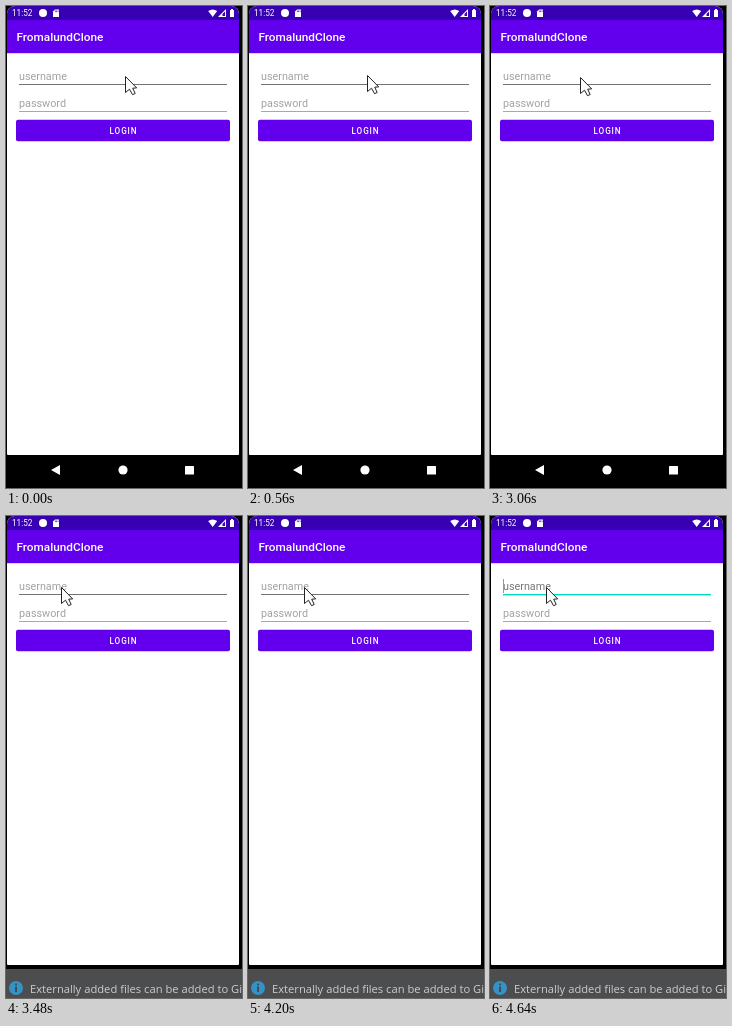
An HTML page with a canvas that plays this animation: 236 by 482 pixels, repeating every 8 s.

```html
<!DOCTYPE html>
<html lang="en">
<head>
<meta charset="utf-8">
<title>Login screen</title>
<style>
  html, body { margin: 0; width: 100%; height: 100%; overflow: hidden; background: #000; }
  canvas { display: block; width: 236px; height: 482px; }
</style>
</head>
<body>
<canvas id="stage"></canvas>
<script>
const W = 236, H = 482, LOOP = 8000;
const NOTICE_AT = 3180, FOCUS_AT = 4640;
const PURPLE = '#6200ee', DARK_PURPLE = '#3700b3', TEAL = '#03dac5';

// The pointer jumps between these spots: [time, x, y]
const POINTER = [
  [0, 119, 70], [560, 119, 69], [3060, 90, 71], [3180, 65, 71],
  [3330, 56, 71], [3480, 55, 71], [4200, 56, 71]
];

const canvas = document.getElementById('stage');
const ctx = canvas.getContext('2d');
const dpr = window.devicePixelRatio || 1;
canvas.width = W * dpr;
canvas.height = H * dpr;
ctx.scale(dpr, dpr);

function rect(x, y, w, h, color) {
  ctx.fillStyle = color;
  ctx.fillRect(x, y, w, h);
}

function roundRect(x, y, w, h, r, color) {
  ctx.fillStyle = color;
  ctx.beginPath();
  ctx.roundRect(x, y, w, h, r);
  ctx.fill();
}

function circle(x, y, r, color) {
  ctx.fillStyle = color;
  ctx.beginPath();
  ctx.arc(x, y, r, 0, Math.PI * 2);
  ctx.fill();
}

function polygon(points, color) {
  ctx.fillStyle = color;
  ctx.beginPath();
  points.forEach(([x, y]) => ctx.lineTo(x, y));
  ctx.closePath();
  ctx.fill();
}

function text(str, x, y, font, color, spacing = 0) {
  ctx.font = font;
  ctx.letterSpacing = spacing + 'px';
  ctx.fillStyle = color;
  ctx.fillText(str, x, y);
}

function drawStatusBar() {
  rect(1, 0, 232, 14, DARK_PURPLE);
  text('11:52', 6, 10, '8.2px Roboto, sans-serif', '#fff');
  circle(37, 7, 4, '#fff');

  polygon([[49, 3.5], [53, 3.5], [53, 11], [47, 11], [47, 5.5]], '#fff');
  for (const x of [48.9, 50.3, 51.7]) rect(x, 4.5, 0.7, 1.6, DARK_PURPLE);

  ctx.fillStyle = '#fff';
  ctx.beginPath();
  ctx.moveTo(206.7, 11);
  ctx.lineTo(202.2, 5);
  ctx.quadraticCurveTo(206.7, 1.8, 211.2, 5);
  ctx.fill();
  polygon([[220, 3], [220, 11], [212, 11]], '#fff');
  polygon([[219, 5.5], [219, 10], [216.5, 10], [216.5, 8]], DARK_PURPLE);
  roundRect(224, 4, 4, 7, 0.5, '#fff');
  rect(225, 3, 2, 1.2, '#fff');
}

function drawScreen() {
  rect(0, 0, W, H, '#000');
  ctx.save();
  ctx.beginPath();
  ctx.roundRect(1, 0, 232, 449, [8, 8, 1, 1]);
  ctx.clip();
  rect(1, 0, 232, 449, '#fff');
  drawStatusBar();
  rect(1, 14, 232, 33, PURPLE);
  rect(1, 47, 232, 1, '#d8d8d8');
  ctx.restore();
  text('FromalundClone', 10.5, 35, '500 11.8px Roboto, sans-serif', '#fff');
}

function drawForm(focused) {
  const font = '10.8px Roboto, sans-serif';
  text('username', 13, 74, font, focused ? '#777' : '#a2a2a2');
  text('password', 13, 101, font, '#a2a2a2');
  if (focused) {
    rect(13, 78, 208, 1.4, TEAL);
    rect(13, 63, 1, 14, TEAL);
  } else {
    rect(13, 78, 208, 1, '#747474');
  }
  rect(13, 105, 208, 1, '#a8a8a8');

  roundRect(10, 113.7, 214, 21.5, 2, PURPLE);
  text('LOGIN', 103.5, 128, '500 8.2px Roboto, sans-serif', '#fff', 0.9);
}

function drawNavigation() {
  polygon([[45, 464], [54, 459], [54, 469]], '#fff');
  circle(117, 464, 4.6, '#fff');
  roundRect(179, 460, 9, 8.5, 0.5, '#fff');
}

function drawNotice() {
  rect(0, 453, W, 29, '#4b4d4f');
  circle(10, 472, 7, '#3592c4');
  rect(9.2, 467.6, 1.7, 1.7, '#3f4346');
  rect(9.2, 470.5, 1.7, 5.5, '#3f4346');
  text('Externally added files can be added to Git', 24, 477,
    '11.2px "Open Sans", sans-serif', '#ccc');
}

function drawPointer(x, y) {
  ctx.save();
  ctx.translate(x + 0.5, y + 0.5);
  polygon([[0, 0], [0, 16], [4, 12.7], [7, 18.2], [9.7, 17],
    [7.2, 11.7], [11.2, 11.4]], '#fff');
  ctx.strokeStyle = '#222';
  ctx.lineWidth = 1;
  ctx.lineJoin = 'round';
  ctx.stroke();
  ctx.restore();
}

function draw(now) {
  const t = now % LOOP;
  drawScreen();
  drawForm(t >= FOCUS_AT);
  if (t >= NOTICE_AT) drawNotice();
  else drawNavigation();
  const [, x, y] = POINTER.findLast(([at]) => t >= at);
  drawPointer(x, y);
}

const start = performance.now();
function tick() {
  draw(performance.now() - start);
  requestAnimationFrame(tick);
}
tick();
</script>
</body>
</html>
```
